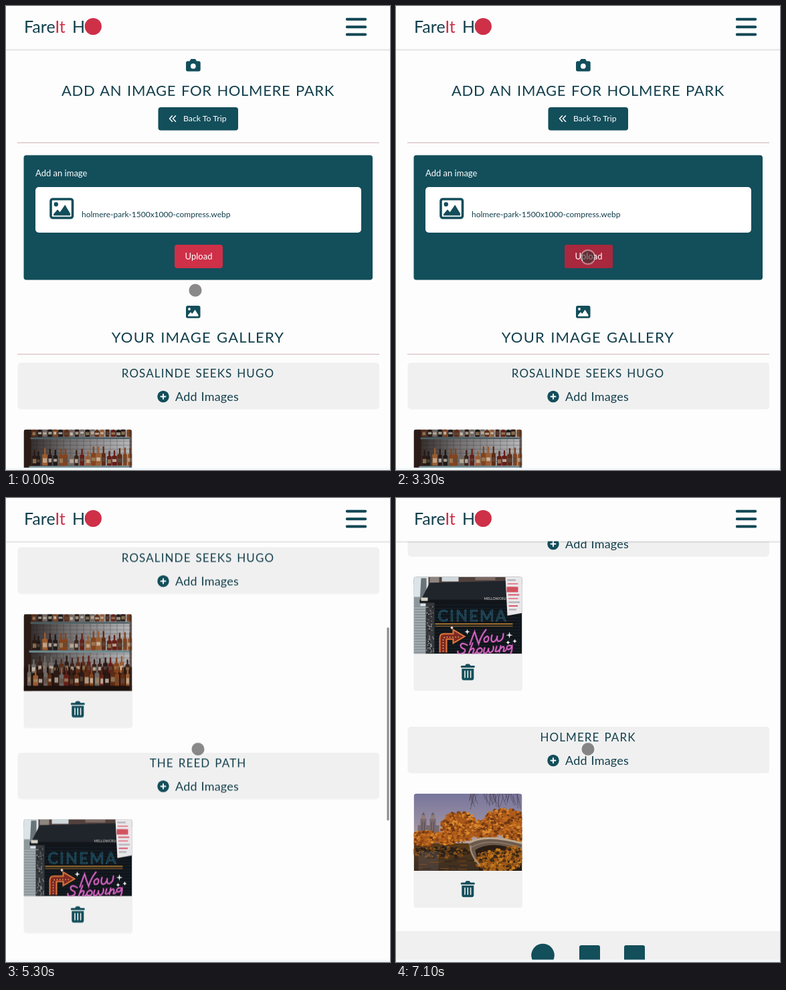
Recreate the animation shown at these times as an HTML page. Size 574 by 692 pixels, loop 7.2 s.

```html
<!DOCTYPE html>
<html lang="en">
<head>
<meta charset="utf-8">
<title>Image gallery</title>
<style>
  html, body { margin: 0; width: 100%; height: 100%; overflow: hidden; background: #fdfdfd; }
  svg { display: block; }
  text { font-family: Lato, sans-serif; fill: #123f4c; }
  .mid { text-anchor: middle; }
  .h2 { font-size: 22px; letter-spacing: .65px; word-spacing: 1.5px; }
  .wide { letter-spacing: 1.15px; }
  .h3 { font-size: 17px; letter-spacing: 1.1px; word-spacing: 1.5px; }
  .add { font-size: 18px; letter-spacing: .2px; word-spacing: 1px; }
  .small { font-size: 13px; }
  .white { fill: #fff; }
  .logo { font-size: 25px; }
  .teal { fill: #134e5b; }
  .red { fill: #ce3048; }
  .panel { fill: #f0f0f0; }
  .rule { fill: #d8b9be; }

  .page, .thumb, .bar, .pointer, .hover, .before, .after { animation: 7.2s step-end infinite; }
  .page { animation-name: scroll; }
  .thumb { animation-name: thumb; }
  .bar { animation-name: bar; }
  .pointer { animation-name: glide; }
  .hover { animation-name: hover; }
  .before { animation-name: before; }
  .after { animation-name: after; }

  @keyframes scroll {
    0% { transform: translateY(0); }
    59.71% { transform: translateY(0); animation-timing-function: steps(6); }
    68.04% { transform: translateY(-280px); animation-timing-function: steps(4); }
    73.6% { transform: translateY(-458.5px); animation-timing-function: steps(7); }
    83.32% { transform: translateY(-781.5px); }
    84.71% { transform: translateY(-804px); }
    86.1% { transform: translateY(-815px); }
    87.49%, 100% { transform: translateY(-820px); }
  }
  @keyframes thumb {
    0% { transform: translateY(0); }
    59.71% { transform: translateY(0); animation-timing-function: steps(6); }
    68.04% { transform: translateY(118px); animation-timing-function: steps(4); }
    73.6% { transform: translateY(193px); animation-timing-function: steps(7); }
    83.32% { transform: translateY(329px); }
    84.71% { transform: translateY(338.5px); }
    86.1% { transform: translateY(343px); }
    87.49%, 100% { transform: translateY(345px); }
  }
  @keyframes bar {
    0% { opacity: 0; }
    61.1% { opacity: 1; }
    93.04% { opacity: .5; }
    94.43%, 100% { opacity: 0; }
  }
  @keyframes glide {
    0% { transform: translate(283px, 424px); }
    4.16% { transform: translate(283px, 424px); animation-timing-function: steps(6); }
    12.49%, 100% { transform: translate(287px, 374.5px); }
  }
  @keyframes hover { 0% { opacity: 0; } 9.71% { opacity: 1; } 51.38%, 100% { opacity: 0; } }
  @keyframes before { 0% { opacity: 1; } 51.38%, 100% { opacity: 0; } }
  @keyframes after { 0% { opacity: 0; } 51.38%, 100% { opacity: 1; } }
</style>
</head>
<body>
<svg width="574" height="692" viewBox="0 0 574 692">
  <defs>
    <clipPath id="frame"><path d="M0 115V4a4 4 0 0 1 4-4H158a4 4 0 0 1 4 4V115Z"/></clipPath>
    <pattern id="tiles" width="10" height="6" patternUnits="userSpaceOnUse">
      <rect width="10" height="6" fill="#77777a"/>
      <rect width="9.3" height="5.3" fill="#b9b9bc"/>
    </pattern>
    <linearGradient id="shade">
      <stop offset="0" stop-color="#1a1210" stop-opacity=".9"/>
      <stop offset=".4" stop-color="#1a1210" stop-opacity=".45"/>
      <stop offset="1" stop-color="#1a1210" stop-opacity="0"/>
    </linearGradient>
    <linearGradient id="sky" x2="0" y2="1">
      <stop offset="0" stop-color="#77759c"/>
      <stop offset="1" stop-color="#b3a3a6"/>
    </linearGradient>
    <linearGradient id="lake" x2="0" y2="1">
      <stop offset="0" stop-color="#5a3a1a"/>
      <stop offset="1" stop-color="#3a2d22"/>
    </linearGradient>
    <g id="picture">
      <rect width="21.5" height="18.5" rx="2.7" class="teal"/>
      <circle cx="5" cy="5" r="1.9" fill="#fdfdfd"/>
      <path d="M3 15.8V14l4-4.5 2.3 2.6 4.2-6 5 7.6v2.1Z" fill="#fdfdfd"/>
    </g>
    <g id="section">
      <rect x="17.5" width="540.5" height="69.5" rx="5" class="panel"/>
      <circle cx="235" cy="50.5" r="8.7" class="teal"/>
      <path d="M231.5 50.5h7M235 47v7" stroke="#fff" stroke-width="1.9" stroke-linecap="round"/>
      <text x="253" y="57" class="add">Add Images</text>
    </g>
    <g id="card">
      <rect width="162.5" height="170" rx="4" class="panel"/>
      <g transform="translate(70.2 130)" class="teal">
        <path d="M6.5 2.5 7.6.8A1.5 1.5 0 0 1 9 0h3.2a1.5 1.5 0 0 1 1.4.8l1.1 1.7h5a1.5 1.5 0 0 1 0 3H1.5a1.5 1.5 0 0 1 0-3Z"/>
        <path d="M1.6 7h18v14.200a3 3 0 0 1-3 3h-12a3 3 0 0 1-3-3Z"/>
        <path d="M6.300 10.500v9.800M10.600 10.500v9.800M14.900 10.500v9.800" stroke="#f0f0f0" stroke-width="1.600" stroke-linecap="round"/>
      </g>
    </g>
  </defs>

  <rect width="574" height="692" fill="#fdfdfd"/>

  <g class="page">
    <path d="M274.5 82.3l1.200-2.100a1.800 1.800 0 0 1 1.600-1.100h4.900a1.800 1.800 0 0 1 1.600 1.100L285 82.300h3a2.700 2.700 0 0 1 2.700 2.700v9.800a2.700 2.700 0 0 1-2.700 2.700h-16.300a2.700 2.700 0 0 1-2.700-2.700V85a2.700 2.700 0 0 1 2.700-2.700Z" class="teal"/>
    <circle cx="279.800" cy="89.700" r="3.900" fill="#fdfdfd"/>
    <text x="287" y="133.500" class="h2 mid">ADD AN IMAGE FOR HOLMERE PARK</text>
    <rect x="227.500" y="151" width="119.500" height="34.500" rx="4" class="teal"/>
    <path d="M248.500 163.800l-4 4.200 4 4.200M253.500 163.800l-4 4.200 4 4.200" fill="none" stroke="#fff" stroke-width="1.500" stroke-linecap="round" stroke-linejoin="round"/>
    <text x="265" y="172.300" class="white" font-size="12.300">Back To Trip</text>
    <rect x="17" y="203.300" width="541" height="1.200" class="rule"/>

    <rect x="26.500" y="222.500" width="521.500" height="186" rx="4" class="teal"/>
    <text x="44" y="253.500" class="small white">Add an image</text>
    <rect x="44" y="270" width="487" height="68" rx="5" class="white"/>
    <rect x="67" y="288" width="32.500" height="28" rx="3" fill="none" stroke="#134e5b" stroke-width="3.600"/>
    <circle cx="74.800" cy="295.700" r="3.200" class="teal"/>
    <path d="M71 312.500v-2l6-7 3.600 4 7.600-11L96 309.500v3Z" class="teal"/>
    <text x="113" y="315" font-size="12" class="before">holmere-park-1500x1000-compress.webp</text>
    <text x="113" y="315" class="small after">Select A File</text>
    <rect x="252" y="356" width="72" height="35" rx="4" class="red"/>
    <rect x="252" y="356" width="72" height="35" rx="4" fill="#a8283d" class="hover"/>
    <text x="288" y="377.500" class="small white mid">Upload</text>

    <use href="#picture" x="269" y="447"/>
    <text x="287" y="502" class="h2 wide mid">YOUR IMAGE GALLERY</text>
    <rect x="17" y="518.800" width="541" height="1.100" class="rule"/>

    <use href="#section" y="532"/>
    <text x="287" y="554" class="h3 mid">ROSALINDE SEEKS HUGO</text>
    <use href="#card" x="26.500" y="631.500"/>
    <g transform="translate(26.500 631.500)"><g id="bar-photo" clip-path="url(#frame)"></g></g>

    <use href="#section" y="838"/>
    <text x="287" y="860" class="h3 mid">THE REED PATH</text>
    <use href="#card" x="26.500" y="937.500"/>
    <g transform="translate(26.500 937.500)"><g id="cinema-photo" clip-path="url(#frame)"></g></g>

    <use href="#section" y="1161"/>
    <text x="287" y="1183" class="h3 mid">HOLMERE PARK</text>
    <use href="#card" x="26.500" y="1261"/>
    <g transform="translate(26.500 1261)"><g id="park-photo" clip-path="url(#frame)"></g></g>

    <rect y="1466" width="574" height="60" class="panel"/>
    <circle cx="219.500" cy="1502" r="17.300" class="teal"/>
    <rect x="274" y="1487" width="31" height="31" rx="3" class="teal"/>
    <rect x="341" y="1487" width="31" height="31" rx="3" class="teal"/>
  </g>

  <rect y="64" width="574" height="3" fill="#000" opacity=".05"/>
  <rect y="64" width="574" height="1.700" fill="#000" opacity=".07"/>
  <rect width="574" height="64.500" fill="#fdfdfd"/>
  <text x="27" y="39.500" class="logo">Fare<tspan class="red">It</tspan></text>
  <text x="99" y="39.500" class="logo">H</text>
  <circle cx="130.300" cy="30.500" r="12.600" class="red"/>
  <path d="M509.800 19.700h27.400M509.800 31.200h27.400M509.800 42.600h27.400" stroke="#0f4653" stroke-width="4" stroke-linecap="round"/>
  <rect y="688.500" width="574" height="4" fill="#f2f7fa"/>

  <g class="bar"><rect x="569.500" width="3" height="288" rx="1.500" fill="#898989" class="thumb"/></g>

  <g class="pointer">
    <circle r="9.700" fill="#323232" fill-opacity=".57"/>
    <circle r="10.400" fill="none" stroke="#fff" stroke-opacity=".5" stroke-width="1.600"/>
  </g>
</svg>

<script>
  let seed = 11;
  const rnd = (a = 0, b = 1) => {
    seed = (seed * 16807) % 2147483647;
    return a + (b - a) * seed / 2147483647;
  };
  const pick = list => list[Math.floor(rnd(0, list.length))];
  const rect = (x, y, w, h, fill, extra = '') =>
    `<rect x="${x}" y="${y}" width="${w}" height="${h}" fill="${fill}" ${extra}/>`;
  const path = (d, fill, extra = '') => `<path d="${d}" fill="${fill}" ${extra}/>`;
  const oval = (x, y, rx, ry, fill) =>
    `<ellipse cx="${x}" cy="${y}" rx="${rx}" ry="${ry}" fill="${fill}"/>`;
  const line = (d, color, width, dash = 'none') =>
    path(d, 'none', `stroke="${color}" stroke-width="${width}" stroke-dasharray="${dash}" stroke-linecap="round"`);
  const many = (n, make) => Array.from({ length: n }, (_, i) => make(i)).join('');
  const show = (id, ...parts) => document.getElementById(id).innerHTML = parts.join('');

  // Bar shelves
  const glass = ['#5c2c16', '#84431c', '#2c1a16', '#9a5c30', '#1f1a19', '#641f17', '#6f6763', '#3b2219'];
  const paper = ['#c9bca6', '#a08864', '#d8d0c2', '#5f4b3c'];
  const bottle = (x, base, h) => {
    const w = rnd(5.5, 7.8), body = h * .66, color = pick(glass);
    return rect(x + w / 2 - 1.2, base - h, 2.4, h - body + 2, color) +
      rect(x, base - body, w, body, color, 'rx="1.6"') +
      rect(x + .8, base - body * .65, w - 1.6, body * rnd(.25, .45), pick(paper), 'opacity=".75"');
  };
  const shelf = (base, h, step, from) =>
    many(Math.ceil((158 - from) / step), i => bottle(from + i * step + rnd(-.8, .8), base, h * rnd(.82, 1.1)));
  show('bar-photo',
    rect(0, 0, 162, 115, 'url(#tiles)'),
    rect(0, 0, 162, 115, 'url(#shade)'),
    rect(0, 0, 11, 115, '#2b1b16'),
    shelf(11, 17, 7.8, 13),
    rect(10, 12, 148, 2.5, '#4d6064'),
    shelf(54, 26, 8, 12),
    rect(8, 54.5, 152, 3, '#6f8b90'),
    rect(0, 79, 162, 36, '#23150f'),
    shelf(88, 24, 8.2, 12),
    shelf(108, 31, 7.7, 6),
    rect(0, 107, 162, 8, '#1b100c'),
    rect(158, 0, 4, 115, '#3a2923', 'opacity=".6"'));

  // Cinema front
  const star = (x, y, r) =>
    path(`M${x} ${y - r}l1 ${r - 1} ${r - 1} 1-${r - 1} 1-1 ${r - 1}-1-${r - 1}-${r - 1}-1 ${r - 1}-1Z`, '#f0eef4');
  const neon = d => line(d, '#7a2f72', 3) + line(d, '#de74cb', 1.3);
  const now = 'M84 101Q88 89 91 82Q94 92 97 100Q101 87 108 79' +
    'M109 89Q103 92 106 97Q112 98 112 91Q110 87 108 90' +
    'M117 87Q114 97 119 97Q124 96 125 88Q123 97 128 96Q134 94 134 85';
  const showing = 'M80 102Q72 97 70 102Q70 106 76 108Q79 113 70 115Q65 115 66 111' +
    'M82 115L88 99M84 110Q90 104 90 109L88 115Q91 116 94 112' +
    'M99 106Q92 109 96 114Q103 114 102 108Q100 105 98 107' +
    'M106 106Q103 115 107 114Q111 113 112 106Q111 114 115 113Q120 110 119 104' +
    'M124 104L122 111Q124 113 128 109M128 112L130 103M129 108Q135 101 135 107L134 111Q136 112 138 109' +
    'M147 103Q139 101 139 107Q142 111 147 104Q147 113 143 117Q139 119 138 115';
  const arrow = 'M39 113V91q0-6 6-6h14v-6l17 10-17 10v-6H49v20';
  show('cinema-photo',
    rect(0, 0, 162, 115, '#0f151a'),
    rect(0, 0, 162, 12, '#51413d'),
    rect(0, 0, 22, 48, '#dbe4e8'),
    rect(24, 0, 14, 9, '#8d8580'), rect(42, 0, 25, 7, '#cfd8dc'), rect(92, 0, 30, 5, '#7c6a64'),
    rect(0, 30, 10, 14, '#8e989c'), path('M11 2H19V40H9Z', '#6a7478'),
    rect(0, 44, 19, 71, '#a3acb0'),
    many(18, i => rect(0, 44 + i * 4, 19, 1, '#737c81')),
    rect(18, 38, 13, 77, '#36393c'),
    many(70, () => rect(rnd(18, 29), rnd(40, 114), 1.5, 1.5, pick(['#8a8e8f', '#17191c', '#a6a9aa']))),
    path('M24 9 139 6V37L9 38Z', '#20252c'),
    path('M9 34H139V37L9 39Z', '#12161a'),
    rect(11, 31, 10, 5, '#d6d3c8'),
    '<text x="105" y="34.5" font-size="5.2" style="fill:#ddd9d0">MELLOWCRUS</text>',
    many(16, i => rect(31, 42 + i * 4.6, 131, .7, '#1e272e')),
    `<text x="36" y="66" font-size="23" letter-spacing="2.5" stroke="#2c6980" stroke-width="1.2"
      stroke-dasharray="1.5 .9" style="fill:#132c39">CINEMA</text>`,
    rect(32, 69.5, 116, 1.5, '#c98a35'), rect(32, 73, 116, 1.3, '#89602f'),
    path(arrow, '#7e2924', 'stroke="#e2793a" stroke-width="2"'),
    line('M44 111V94q0-4 4-4h20', '#f3c26b', 1.6, '.2 4'),
    neon(now), neon(showing),
    star(80, 82, 4), star(143, 87, 5), star(141, 98, 3), star(57, 76, 2.5), star(151, 96, 3),
    path('M137 0H162V54L140 58Z', '#e9e6ea'),
    many(9, i => rect(140 + i * .3, 4 + i * 5.5, rnd(9, 18), 1.9, pick(['#d65361', '#e38089', '#a9a7ad']))),
    rect(139, 15, 17, 8, '#d2525f'));

  // Autumn lake
  const amber = ['#a8581a', '#c66c1c', '#8a4517', '#d98a2e', '#6b3614', '#b45e1a'];
  const bush = ['#9a5618', '#c47a1e', '#5a3514', '#3a2814', '#ad661a'];
  const water = ['#2f2318', '#6b4018', '#8a5219', '#241e18'];
  const tree = (x, y, rx, ry, colors = amber) =>
    oval(x, y, rx * .95, ry * .92, colors[0]) +
    many(Math.round(rx * ry / 2), () => {
      const a = rnd(0, 6.283), r = Math.sqrt(rnd()), s = rnd(.8, 2.4);
      return oval(x + Math.cos(a) * r * rx, y + Math.sin(a) * r * ry, s * 1.2, s, pick(colors));
    });
  const tower = x => rect(x, 37, 9, 36, '#79686d') + rect(x + 1.5, 32, 6, 6, '#8f7a78') +
    path(`M${x + 2} 32l2.5-5 2.5 5Z`, '#6c5f69') + rect(x + 2, 42, 1, 24, '#544c56') + rect(x + 5.5, 42, 1, 24, '#544c56');
  show('park-photo',
    rect(0, 0, 162, 80, 'url(#sky)'),
    rect(6, 47, 32, 28, '#776a70'), tower(10), tower(24),
    rect(0, 74, 162, 41, 'url(#lake)'),
    tree(16, 66, 22, 12), tree(48, 66, 18, 10), tree(69, 50, 28, 23),
    tree(108, 54, 20, 17), tree(136, 43, 32, 21), tree(152, 60, 18, 13),
    tree(40, 87, 46, 8, water),
    rect(7, 86, 30, 29, '#5f5658', 'opacity=".4"'),
    many(30, () => rect(rnd(0, 75), rnd(82, 114), rnd(6, 16), .9, pick(water))),
    path('M82 75Q104 58 162 74V88Q126 74 100 86L95 102 84 84Z', '#6b5a4c'),
    path('M92 84Q116 68 162 86V115H98Z', '#2a1d14'),
    tree(128, 100, 36, 17, bush), tree(150, 90, 15, 13, bush),
    line('M83 73Q108 59 162 74', '#bba892', 3),
    line('M86 80Q112 64 162 81', '#8d7b69', 1.6),
    line('M85 78Q84 90 98 106', '#a38f7b', 2.2),
    many(34, () => {
      const x = rnd(84, 156);
      return line(`M${x} 0q${rnd(-5, 5)} ${rnd(0, 8)} ${rnd(-7, 7)} ${rnd(7, 23)}`, '#4b3e4d', .6);
    }));
</script>
</body>
</html>
```
